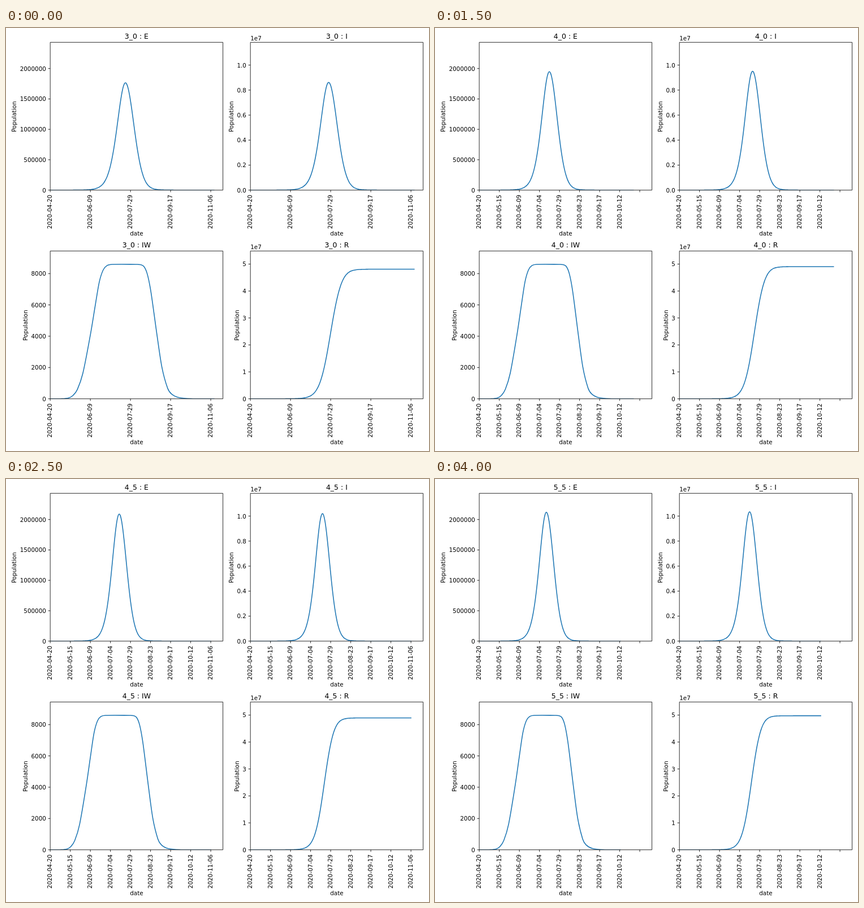
These frames come from a looping animation (748x748 px, 4.5 s). An HTML page:

```html
<!DOCTYPE html>
<html lang="en">
<head>
<meta charset="utf-8">
<title>Epidemic scan</title>
<style>
  html, body { margin: 0; width: 100%; height: 100%; overflow: hidden; background: #fff; }
  svg { display: block; width: 748px; height: 748px; font: 10.39px "DejaVu Sans", sans-serif; }
  .title { font-size: 12.47px; }
  .mid { text-anchor: middle; }
  .end { text-anchor: end; }
  .axis { fill: none; stroke: #000; stroke-width: .83; }
  .curve { fill: none; stroke: #1f77b4; stroke-width: 1.56; stroke-linejoin: round; stroke-linecap: square; }
</style>
</head>
<body>
<svg id="stage" viewBox="0 0 748 748"></svg>
<script>
const STEP_MS = 500, WIDTH = 305.4, HEIGHT = 261.4, PX_PER_DAY = 1.4195;

// x, y: left and bottom of the axes; unit: pixels per million (per thousand for IW)
const panels = [
  { name: 'E',  x: 78.2,  y: 286.7, unit: 107.5, labelX: 18.3,  gap: 53.75, ticks: ['0', '500000', '1000000', '1500000', '2000000'] },
  { name: 'I',  x: 432.2, y: 286.7, unit: 22.11, labelX: 402,   gap: 44.22, ticks: ['0.0', '0.2', '0.4', '0.6', '0.8', '1.0'], power: '1e7' },
  { name: 'IW', x: 78.2,  y: 655.7, unit: 27.68, labelX: 38.1,  gap: 55.35, ticks: ['0', '2000', '4000', '6000', '8000'] },
  { name: 'R',  x: 432.2, y: 655.7, unit: 4.765, labelX: 411.9, gap: 47.65, ticks: ['0', '1', '2', '3', '4', '5'], power: '1e7' }
];

// peak: x of the E maximum; top, total: millions; rise, fall: x and width factor of the IW flanks
const runs = [
  { id: '3_0',  days: 204, gap: 50, labels: 5, ticks: 5, peak: 133,   top: 1.765, total: 48.1,  rise: [71.3, .97],  fall: [188.5, 1] },
  { id: '3_25', days: 205, gap: 50, labels: 5, ticks: 5, peak: 130,   top: 1.8,   total: 48.05, rise: [69, .94],    fall: [185, .98] },
  { id: '3_5',  days: 218, gap: 50, labels: 5, ticks: 5, peak: 127,   top: 1.845, total: 48,    rise: [66.3, .9],   fall: [181.5, .96] },
  { id: '4_0',  days: 192, gap: 25, labels: 8, ticks: 9, peak: 124,   top: 1.948, total: 49.05, rise: [67, .87],    fall: [175, .92] },
  { id: '4_25', days: 210, gap: 50, labels: 5, ticks: 5, peak: 123,   top: 2.02,  total: 49,    rise: [65.4, .86],  fall: [174.2, .9] },
  { id: '4_5',  days: 200, gap: 25, labels: 9, ticks: 9, peak: 122,   top: 2.09,  total: 48.95, rise: [63.9, .85],  fall: [173.3, .9] },
  { id: '5_0',  days: 175, gap: 25, labels: 8, ticks: 8, peak: 115.7, top: 2.208, total: 49.85, rise: [60.8, .83],  fall: [162.7, .86] },
  { id: '5_25', days: 183, gap: 25, labels: 8, ticks: 9, peak: 117.2, top: 2.165, total: 49.8,  rise: [62.3, .84],  fall: [164.5, .87] },
  { id: '5_5',  days: 176, gap: 25, labels: 8, ticks: 9, peak: 118.7, top: 2.12,  total: 49.75, rise: [63.7, .84],  fall: [166.2, .88] }
];

const RISE = [[-55, 0], [-40, .006], [-32, .025], [-24, .07], [-14, .19], [0, .483],
              [9, .705], [16, .87], [23, .958], [30, .991], [40, 1]];
const FALL = [[-37, 1], [-29, .998], [-23, .985], [-17, .93], [-11, .81], [-4, .605], [0, .483],
              [9, .235], [19, .08], [26, .036], [39, .009], [64, 0]];

const text = (x, y, str, cls = '', turned = false) =>
  `<text class="${cls}" ${turned ? `transform="translate(${x} ${y}) rotate(-90)"` : `x="${x}" y="${y}"`}>${str}</text>`;
const line = d => `<path class="axis" d="${d}"/>`;
const dateLabel = day => new Date(Date.UTC(2020, 3, 20 + day)).toISOString().slice(0, 10);

// Smooth path through points with free spacing
function smoothPath(pts) {
  const slope = i => {
    const a = pts[Math.max(i - 1, 0)], b = pts[Math.min(i + 1, pts.length - 1)];
    return (b[1] - a[1]) / (b[0] - a[0]);
  };
  let d = `M${pts[0]}`;
  for (let i = 1; i < pts.length; i++) {
    const [x0, y0] = pts[i - 1], [x1, y1] = pts[i], h = (x1 - x0) / 3;
    d += `C${x0 + h},${y0 + slope(i - 1) * h} ${x1 - h},${y1 - slope(i) * h} ${x1},${y1}`;
  }
  return d;
}

// Unit-height wave of area 2w: sech² blended with a Gaussian, which is stronger on the falling side
function bell(x, w) {
  const u = x / w, gauss = x < 0 ? .2 : .6;
  return (1 - gauss) * Math.cosh(u) ** -2 + gauss * Math.exp(-Math.PI / 4 * u * u);
}

function curvePoints(name, run) {
  const end = run.days * PX_PER_DAY;
  if (name === 'IW') {
    const place = (shape, [mid, k]) => shape.map(([dx, h]) => [mid + dx * k, h * 8.588]);
    return [[0, 0], ...place(RISE, run.rise), ...place(FALL, run.fall), [end, 0]];
  }
  const w = run.total / (2 * run.top) * PX_PER_DAY;
  const center = run.peak + { E: 0, I: 5.4, R: 8.5 }[name];
  const height = { E: run.top, I: run.top * 4.88, R: run.top }[name];
  let sum = 0;
  return Array.from({ length: run.days + 1 }, (_, day) => {
    const x = day * PX_PER_DAY, now = height * bell(x - center, w);
    sum += now;
    return [x, name === 'R' ? sum - now / 2 : now];
  });
}

function fixedPart(p) {
  const top = p.y - HEIGHT;
  let out = text(p.x + WIDTH / 2, p.y + 80.2, 'date', 'mid') +
            text(p.labelX, p.y - HEIGHT / 2 + .8, 'Population', 'mid', true);
  p.ticks.forEach((label, i) => {
    const y = p.y - i * p.gap;
    out += line(`M${p.x} ${y}h-3.64`) + text(p.x - 7.3, y + 3.9, label, 'end');
  });
  if (p.power) out += text(p.x, top - 3.1, p.power);
  return out + line(`M${p.x} ${top}h${WIDTH}v${HEIGHT}h${-WIDTH}z`);
}

function runPart(p, run) {
  const pts = curvePoints(p.name, run).map(([x, v]) => [p.x + x, p.y - v * p.unit]);
  let out = `<path class="curve" clip-path="url(#clip${p.name})" d="${smoothPath(pts)}"/>` +
            text(p.x + WIDTH / 2, p.y - HEIGHT - 6.2, `${run.id} : ${p.name}`, 'title mid');
  for (let i = 0; i < run.ticks; i++) {
    const day = i * run.gap, x = p.x + day * PX_PER_DAY;
    out += line(`M${x} ${p.y}v3.64`);
    if (i < run.labels) out += text(x + 3, p.y + 8.2, dateLabel(day), 'end', true);
  }
  return out;
}

const stage = document.getElementById('stage');
stage.innerHTML =
  '<defs>' + panels.map(p =>
    `<clipPath id="clip${p.name}"><rect x="${p.x}" y="${p.y - HEIGHT}" width="${WIDTH}" height="${HEIGHT}"/></clipPath>`
  ).join('') + '</defs>' +
  runs.map(run => `<g class="run" visibility="hidden">${panels.map(p => runPart(p, run)).join('')}</g>`).join('') +
  panels.map(fixedPart).join('');

const groups = [...stage.querySelectorAll('.run')];
const start = performance.now();
let shown = -1;

function show() {
  const index = Math.floor(Math.max(0, performance.now() - start) / STEP_MS) % runs.length;
  if (index !== shown) {
    groups.forEach((g, i) => g.setAttribute('visibility', i === index ? 'visible' : 'hidden'));
    shown = index;
  }
  requestAnimationFrame(show);
}
show();
</script>
</body>
</html>
```
